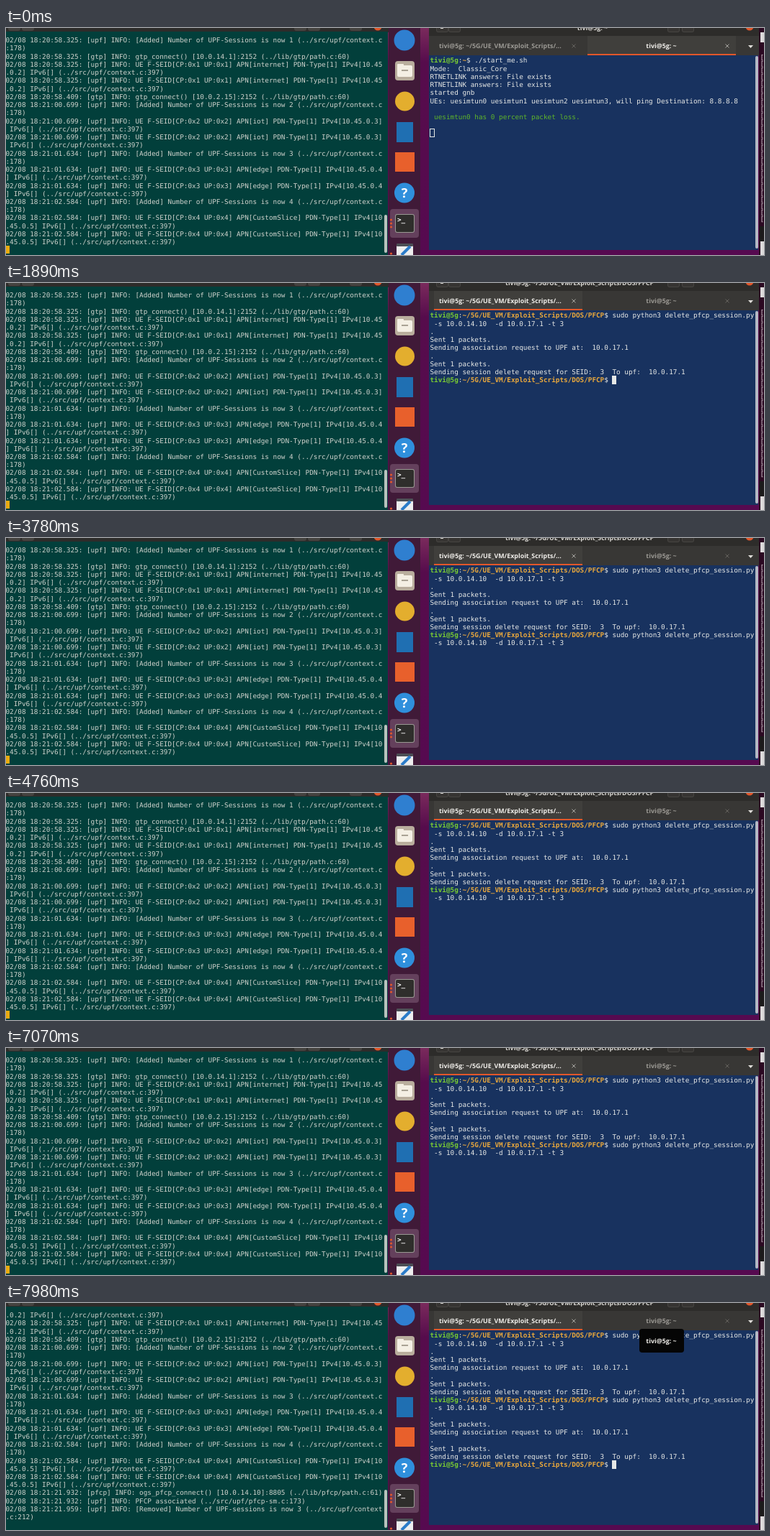
Animation, 1052 px wide and 316 px high, one loop 8 s. Source, as an HTML page with a canvas:

```html
<!DOCTYPE html>
<html lang="en">
<head>
<meta charset="utf-8">
<title>UPF session terminals</title>
<style>
html, body { margin: 0; width: 100%; height: 100%; overflow: hidden; background: #3a0b35; }
canvas { display: block; }
</style>
</head>
<body>
<canvas id="stage" width="1052" height="316"></canvas>
<script>
const ctx = document.getElementById('stage').getContext('2d');
const LOOP = 8000, CELL = 5.622, ROW = 11.24, COLS = 93, LEFT_ROWS = 26;
const MONO = '"DejaVu Sans Mono", monospace', SANS = '"Open Sans", sans-serif';
const WHITE = '#e6e8e6', GREEN = '#7acb32', PING = '#5fb52a', GOLD = '#eba93c';

// Moments at which the screen changes, in ms
const CUE = { ping: 980, tab: 1750, recall: 2660, run: 3570, assoc: 7140, removed: 7210, tip: 7700 };

// ---------- drawing helpers ----------
function box(x, y, w, h, fill, r = 0) {
  ctx.fillStyle = fill;
  ctx.beginPath();
  ctx.roundRect(x, y, w, h, r);
  ctx.fill();
}
function disc(x, y, r, fill) {
  ctx.fillStyle = fill;
  ctx.beginPath();
  ctx.arc(x, y, r, 0, 7);
  ctx.fill();
}
function line(color, width, ...points) {
  ctx.strokeStyle = color;
  ctx.lineWidth = width;
  ctx.beginPath();
  points.forEach(([x, y]) => ctx.lineTo(x, y));
  ctx.stroke();
}
function label(text, x, y, fill, align = 'left', size = 8.9) {
  ctx.font = `bold ${size}px ${SANS}`;
  ctx.textAlign = align;
  ctx.fillStyle = fill;
  ctx.fillText(text, x, y);
}
// Terminal text sits on a fixed character grid
function cells(text, x, y, fill, bold) {
  ctx.font = `${bold ? 'bold ' : ''}9.35px ${MONO}`;
  ctx.textAlign = 'left';
  ctx.fillStyle = fill;
  [...text].forEach((ch, i) => ch !== ' ' && ctx.fillText(ch, x + i * CELL, y));
}
function spans(parts, x, y) {
  for (const [text, fill = WHITE, bold = false] of parts) {
    cells(text, x, y, fill, bold);
    x += text.length * CELL;
  }
}

// ---------- left terminal: core log ----------
const log = (time, text, unit = 'upf') => `02/08 18:${time}: [${unit}] INFO: ${text}`;
const added = (time, n) =>
  log(time, `[Added] Number of UPF-Sessions is now ${n} (../src/upf/context.c:178)`);
function session(time, n, apn) {
  const text = log(time, `UE F-SEID[CP:0x${n} UP:0x${n}] APN[${apn}] PDN-Type[1] ` +
    `IPv4[10.45.0.${n + 1}] IPv6[] (../src/upf/context.c:397)`);
  return [text, text];
}
const gtp = (time, ip) => log(time, `gtp_connect() [${ip}]:2152 (../lib/gtp/path.c:60)`, 'gtp');

const startLog = [
  added('20:58.325', 1), gtp('20:58.325', '10.0.14.1'), ...session('20:58.325', 1, 'internet'),
  gtp('20:58.409', '10.0.2.15'),
  added('21:00.699', 2), ...session('21:00.699', 2, 'iot'),
  added('21:01.634', 3), ...session('21:01.634', 3, 'edge'),
  added('21:02.584', 4), ...session('21:02.584', 4, 'CustomSlice')
];
const assocLog = [
  log('21:21.932', 'ogs_pfcp_connect() [10.0.14.10]:8805 (../lib/pfcp/path.c:61)', 'pfcp'),
  log('21:21.932', 'PFCP associated (../src/upf/pfcp-sm.c:173)')
];
const removedLog = [
  log('21:21.959', '[Removed] Number of UPF-sessions is now 3 (../src/upf/context.c:212)')
];
const wrap = text => text.match(new RegExp(`.{1,${COLS}}`, 'g'));

function leftTerminal(t) {
  box(0, 0, 531, 6, '#2d2c2a');
  for (const x of [3, 22, 400, 419, 477]) box(x, -8, 17, 12, '#454340', 3);
  disc(516, -2, 5.5, '#e2572b');
  box(0, 5, 530, 311, '#023f3b');
  const entries = [...startLog, ...(t >= CUE.assoc ? assocLog : []),
    ...(t >= CUE.removed ? removedLog : [])];
  entries.flatMap(wrap).slice(-LEFT_ROWS)
    .forEach((row, i) => cells(row, -0.5, 20.2 + i * ROW, '#d0d3cd'));
  if (t < CUE.assoc) box(0, 303, 5, 11, '#e9aa10');
  box(525, 260, 4, 53, '#b9c2bd', 2);
}

// ---------- dock ----------
function dock() {
  const desk = ctx.createLinearGradient(0, 0, 0, 316);
  desk.addColorStop(0, '#7a2a5c');
  desk.addColorStop(0.15, '#560c4c');
  desk.addColorStop(1, '#560a50');
  box(530, 0, 522, 316, desk);
  box(531, 0, 44, 316, '#401a38');
  disc(553, 17, 14.5, '#2f7fd0');

  box(540, 46, 27, 27, '#b9ae9d', 4);
  box(543, 52, 21, 16, '#f4efe4', 2);
  box(543, 50, 9, 4, '#f4efe4', 1);
  box(549, 58, 9, 2, '#a9a294');

  disc(553.5, 102, 13.5, '#e3ae2e');
  box(542, 131, 23, 28, '#1f6fb2');
  box(540, 173, 27, 27, '#e8602c');

  disc(553, 229.5, 14, '#2f8fdc');
  label('?', 553, 236, '#fff', 'center', 18);

  box(533, 252, 40, 40, '#64405c', 4);
  box(540, 259, 27, 26, '#9a9893', 3);
  box(541, 260, 25, 24, '#2f2e2c', 2);
  cells('>_', 543, 270, '#fff', true);
  for (const y of [267, 272, 277]) disc(534.5, y, 1.6, '#e2572b');

  box(542, 301, 23, 20, '#edeeee', 2);
  box(542, 300, 23, 4, '#4c4f55', 1);
  line('#2b7cc9', 4, [561, 304], [549, 316]);
  disc(534.5, 314, 1.6, '#e2572b');
}

// ---------- right terminal ----------
const HOST = 'tivi@5g', DIR = '~/5G/UE_VM/Exploit_Scripts/DOS/PFCP';
const prompt = (dir, command = '') =>
  [[HOST, GREEN, true], [':'], [dir, GOLD, true], ['$ ' + command]];
const attack = [
  prompt(DIR, 'sudo python3 delete_pfcp_session.py'),
  [[' -s 10.0.14.10  -d 10.0.17.1 -t 3']]
];
const sent = [[['.']], [['Sent 1 packets.']]];
const assocOut = [...sent, [['Sending association request to UPF at:  10.0.17.1']]];
const deleteOut = [...sent, [['Sending session delete request for SEID:  3  To upf:  10.0.17.1']]];
const ping = n => [[[` uesimtun${n} has 0 percent packet loss.`, PING]], []];

function pingScreen(t) {
  return [
    prompt('~', './start_me.sh'),
    [['Mode:  Classic_Core']],
    [['RTNETLINK answers: File exists']],
    [['RTNETLINK answers: File exists']],
    [['started gnb']],
    [['UEs: uesimtun0 uesimtun1 uesimtun2 uesimtun3, will ping Destination: 8.8.8.8']],
    [], ...ping(0), ...(t >= CUE.ping ? ping(1) : []), []
  ];
}
function attackScreen(t) {
  const rows = [...attack, ...assocOut, ...deleteOut];
  if (t < CUE.recall) return [...rows, prompt(DIR)];
  rows.push(...attack);
  if (t >= CUE.assoc) rows.push(...assocOut);
  if (t >= CUE.removed) rows.push(...deleteOut, prompt(DIR));
  return rows;
}

function tabBar(second) {
  const bright = '#f0eeea', dim = '#9b9994';
  box(587, 0, 458, 12, '#2d2c2a');
  for (const x of [597, 614, 918, 938]) {
    box(x, -8, 17, 14, '#474542', 3);
    box(x + 1, -8, 15, 13, '#363432', 2);
  }
  box(603, 0, 4, 1, '#d8d6d2');
  disc(1032, -2, 5.5, '#e2572b');
  label(`${HOST}: ${second ? '~' : DIR}`, second ? 814 : 796, 2.5, '#d8d6d2', 'center');

  box(587, 11, 458, 27, '#383735');
  box(second ? 807 : 594, 11, 206, 27, '#403f3c');
  box(second ? 807 : 594, 36, 206, 2, '#e2572b');
  label(`${HOST}: ~/5G/UE_VM/Exploit_Scripts/...`, 601, 28, second ? dim : bright);
  label(`${HOST}: ~`, 909.5, 28, second ? bright : dim, 'center');
  [[788, !second], [1001, second]].forEach(([x, active]) => {
    const color = active ? '#aaa8a3' : '#65635f';
    line(color, 1, [x - 2.5, 22.5], [x + 2.5, 27.5]);
    line(color, 1, [x + 2.5, 22.5], [x - 2.5, 27.5]);
  });
  ctx.fillStyle = '#e0deda';
  ctx.beginPath();
  ctx.moveTo(1030, 24);
  ctx.lineTo(1037, 24);
  ctx.lineTo(1033.5, 28);
  ctx.fill();
}

function rightTerminal(t) {
  const second = t < CUE.tab, x = 588.5, top = 48.3;
  box(587, 38, 457, 271, '#18325f');
  box(1040, 39, 4, 268, '#b4b9c4', 2);
  const rows = second ? pingScreen(t) : attackScreen(t);
  rows.forEach((row, i) => spans(row, x, top + i * ROW));

  const last = rows.length - 1;
  const column = rows[last].reduce((n, [text]) => n + text.length, 0);
  const cx = Math.round(x + column * CELL), cy = Math.round(top + last * ROW - 9);
  if (second) {
    ctx.strokeStyle = WHITE;
    ctx.lineWidth = 1;
    ctx.strokeRect(cx - 0.5, cy + 0.5, 6, 11);
  } else if (t < CUE.run || t >= CUE.removed) {
    box(cx, cy, 6, 12, WHITE);
  }
  tabBar(second);
  if (t >= CUE.tip) {
    box(879, 36, 62, 33, '#050505', 4);
    label(`${HOST}: ~`, 909.5, 55.5, '#f0eeea', 'center');
  }
}

// Sliver of another window at the right edge
function edgeWindow() {
  box(1045, 0, 7, 316, '#2b0922');
  box(1047, 6, 5, 14, '#dcdadb');
  for (let y = 44; y < 272; y += 9) cells('[', 1046.5, y, '#e0d6dd');
  box(1046, 276, 6, 21, '#1c1a1b');
  box(1047, 297, 5, 19, '#dcdadb');
}

let shown = -1;
function frame() {
  const t = performance.now() % LOOP;
  const step = Object.values(CUE).filter(at => t >= at).length;
  if (step !== shown) {
    shown = step;
    ctx.textRendering = 'geometricPrecision';
    dock();
    leftTerminal(t);
    edgeWindow();
    rightTerminal(t);
  }
  requestAnimationFrame(frame);
}
frame();
</script>
</body>
</html>
```
